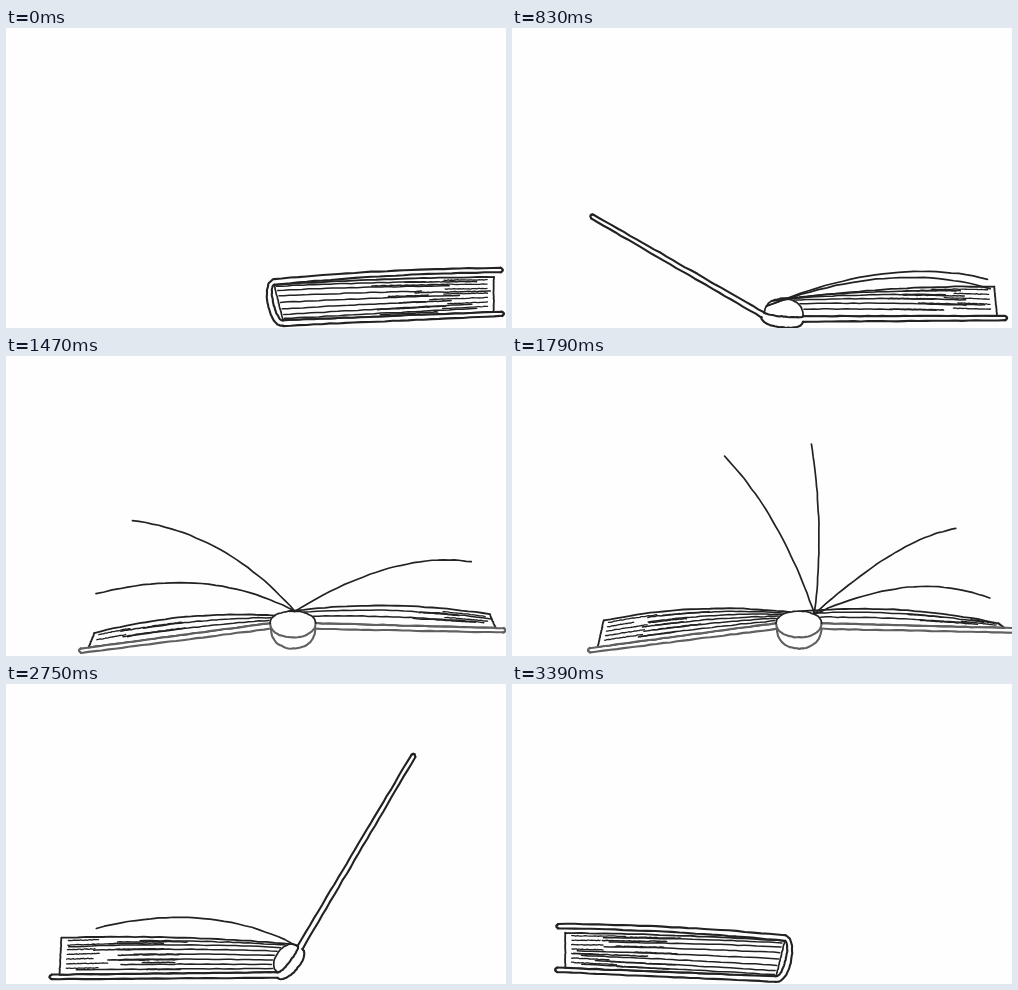
An HTML page with a canvas for the animation above (3.5 s loop, 500 by 300 pixels).

```html
<!DOCTYPE html>
<html lang="en">
<head>
<meta charset="utf-8">
<title>Book</title>
<style>
html, body { margin: 0; width: 100%; height: 100%; overflow: hidden; background: #fefefe; }
canvas { display: block; width: 500px; height: 300px; }
</style>
</head>
<body>
<canvas id="stage" width="500" height="300"></canvas>
<script>
const ctx = document.getElementById('stage').getContext('2d');
const LOOP = 3500, FIRST = 110, STEP = 80, LAST = 42;
const INK = '#222', GREY = '#606060', PAPER = '#fefefe';

// Opening: step, moving hinge x y, lying hinge x y, board length, spine sag, hollow rise
const poses = [
  [0, 268, 254, 277, 295, 219, 8, 0],
  [6, 243, 240, 248, 291, 250, 7, 7],
  [10, 251, 287, 291, 291, 202, 5, 16],
  [15, 264.5, 270, 309.5, 270, 188, 17, 12]
];
const turns = [11.25, 12.2, 17.4, 18.5, 20.8, 21.8];

const clamp = v => Math.min(1, Math.max(0, v));
const ease = v => (v = clamp(v)) * v * (3 - 2 * v);
const mix = (a, b, k) => a + (b - a) * k;
const mid = (p, q, k) => [mix(p[0], q[0], k), mix(p[1], q[1], k)];
const rad = deg => deg * Math.PI / 180;

let seed = 1;
function rnd() {
  seed = (seed * 16807) % 2147483647;
  return seed / 2147483647;
}

// Bezier of any degree
function bezier(...pts) {
  return t => {
    let p = pts;
    while (p.length > 1) p = p.slice(1).map((q, i) => mid(p[i], q, t));
    return p[0];
  };
}

// Hand-drawn stroke along a function of 0..1
function pen(f, width, color = INK) {
  ctx.beginPath();
  for (let i = 0; i <= 28; i++) {
    const [x, y] = f(i / 28);
    ctx.lineTo(x + (rnd() - 0.5) * 0.5, y + (rnd() - 0.5) * 0.6);
  }
  ctx.lineWidth = width;
  ctx.strokeStyle = color;
  ctx.stroke();
}

function lookup(n) {
  let i = 0;
  while (i < poses.length - 2 && poses[i + 1][0] < n) i++;
  const a = poses[i], b = poses[i + 1], k = clamp((n - a[0]) / (b[0] - a[0]));
  return a.slice(1).map((v, j) => mix(v, b[j + 1], k));
}

// Closing is the opening run backwards and mirrored
function bookAt(n) {
  const closing = n > LAST / 2, m = closing ? LAST - n : n;
  const [mx, my, lx, ly, size, sag, rise] = lookup(m);
  const deg = Math.min(closing ? 181.3 : 187.4, 3 + 14.7 * m);
  const lie = mix(2.4, closing ? -7.4 : -1.3, clamp(m / 12) ** 3);
  const reach = mix(227, 191, clamp(m / 12)) + 88 * Math.max(0, Math.sin(rad(deg))) ** 10;
  const moving = { x: mx, y: my, deg, len: reach, bow: 5 * clamp(1 - m / 3) };
  const lying = { x: lx, y: ly, deg: lie, len: size, bow: 0 };
  if (!closing) return { front: moving, back: lying, sag, rise };
  const width = 541 + 33 * clamp((34 - n) / 7);
  const flip = c => ({ ...c, x: width - c.x, deg: 180 - c.deg });
  return { front: flip(lying), back: flip(moving), sag, rise };
}

// Point on a board: distance from its hinge and offset across it
function onBoard(c, dist, off) {
  const dx = Math.cos(rad(c.deg)), dy = -Math.sin(rad(c.deg));
  return [c.x + dx * dist - dy * off, c.y + dy * dist + dx * off];
}

// Curve between the hinges, pushed away from the pages
function spine(p, q, push) {
  const dx = q[0] - p[0], dy = q[1] - p[1], k = push / 0.75 / Math.hypot(dx, dy);
  const shift = r => [r[0] - dy * k, r[1] + dx * k];
  return bezier(p, shift(p), shift(q), q);
}

function boardSide(c, off, color) {
  const p = onBoard(c, 0, off * 2.8), q = onBoard(c, c.len, off * 2.2), m = mid(p, q, 0.5);
  pen(bezier(p, [m[0], m[1] - c.bow], q), 2.1, color);
  return p;
}

function shell({ front, back, sag }, color) {
  for (const s of [1, -1]) {
    const p = boardSide(front, -s, color), q = boardSide(back, s, color);
    pen(spine(p, q, sag + s * 2.8), 2.1, color);
  }
  for (const c of [front, back]) {
    const tip = [-2.2, 2.2].map(off => onBoard(c, c.len, off));
    pen(bezier(tip[0], onBoard(c, c.len + 4, 0), tip[1]), 2.1, color);
  }
}

// Pages lying on a board, fanned from the part a..b of the hollow
function block(c, inward, share, hollow, a, b, n) {
  const hump = Math.sin(Math.PI * n / LAST) ** 2, depth = (35 + 6 * hump) * share;
  if (depth < 2) return;
  const low = onBoard(c, c.len - 8, inward * 2.2);
  const high = [low[0] - Math.sign(Math.cos(rad(c.deg))) * 6 * hump, low[1] - depth];
  const row = (v, u0, u1) => {
    const p = hollow(mix(a, b, v)), q = mid(high, low, v), m = mid(p, q, 0.5);
    const f = bezier(p, [m[0], m[1] - (3 + 12 * hump) * (1 - v)], q);
    return t => f(mix(u0, u1, t));
  };
  pen(row(0, 0, 1), 1.8);
  pen(row(1, 0, 1), 1.5);
  pen(bezier(high, low), 1.8);
  const rows = Math.max(3, Math.round(depth / 4.6));
  for (let i = 1; i < rows; i++) {
    const v = i / rows, s = 0.4 + rnd() * 0.25;
    pen(row(v, 0.01, 0.65 + rnd() * 0.35), 1.5);
    pen(row(v + (rnd() - 0.5) * 0.1, s, s + 0.15 + rnd() * 0.2), 1.5);
    pen(row(v - 0.35 / rows, 0.7 + rnd() * 0.15, 0.97), 1.3);
  }
}

function loosePage(i, n, [hx, hy]) {
  const start = turns[i], last = i === turns.length - 1;
  if (n < (i < 2 ? 5 + 3 * i : start) || n > (last ? 36 : start + 7)) return;
  const rest = Math.min(7, n - 3) - 2.5 * i;
  const a = rad(Math.min(175, Math.max(rest, (n - start) * 26)));
  const r = 200 - (hx - 284) * Math.cos(a) - 30 * Math.sin(a) ** 0.7;
  const x = hx + r * Math.cos(a), y = hy - r * Math.sin(a);
  const bend = 38 * clamp((n - 4) / 6) * Math.abs(Math.cos(a));
  pen(bezier([hx, hy], [(hx + x) / 2 + 12, (hy + y) / 2 - bend], [x, y]), 1.7);
}

function draw(n) {
  seed = 4711 + n * 97;
  ctx.fillStyle = PAPER;
  ctx.fillRect(0, 0, 500, 300);
  ctx.lineCap = ctx.lineJoin = 'round';
  const book = bookAt(n), { front, back } = book;
  const hollow = spine(onBoard(front, 0, 2.8), onBoard(back, 0, -2.8), -book.rise);
  block(back, -1, 1 - clamp((n - 6) / 18), hollow, n / 40, 1, n);
  block(front, 1, clamp((n - 13) / 14), hollow, Math.min(0.98, (n - 13) / 25), 0, n);
  shell(book, n > 13 && n < 30 ? GREY : INK);
  pen(hollow, 1.7);
  const hinge = hollow(ease((n - 4.5) / 26));
  turns.forEach((_, i) => loosePage(i, n, hinge));
}

let shown = -1;
function tick() {
  const t = performance.now() % LOOP;
  const n = t < FIRST ? 0 : Math.min(LAST, 1 + Math.floor((t - FIRST) / STEP));
  if (n !== shown) draw(shown = n);
  requestAnimationFrame(tick);
}
tick();
</script>
</body>
</html>
```
